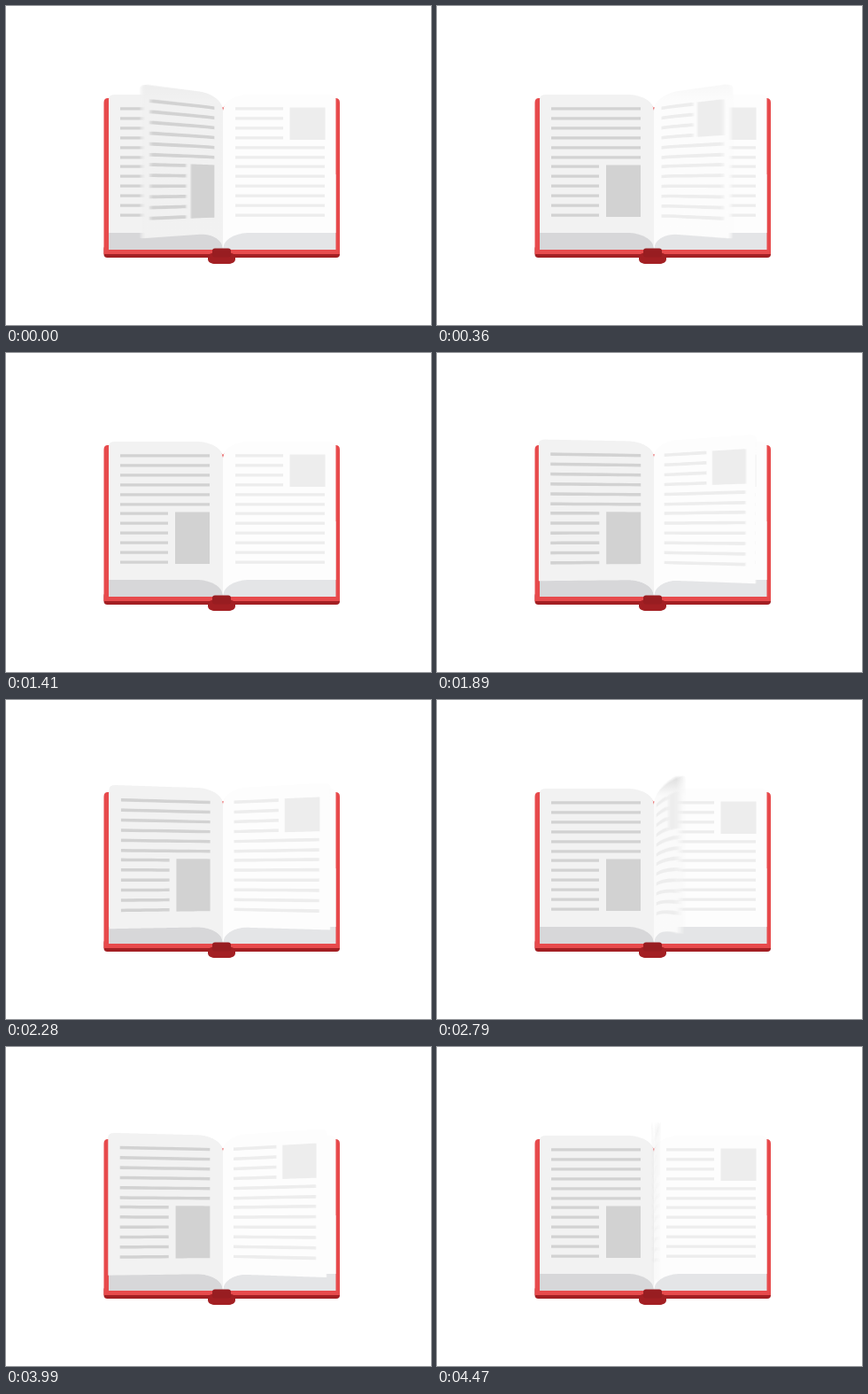
An HTML page with a canvas that plays this animation: 480x360 px, repeating every 4500 ms.

```html
<!DOCTYPE html>
<html lang="en">
<head>
<meta charset="utf-8">
<title>Flipping book</title>
<style>
  html, body { margin: 0; width: 100%; height: 100%; overflow: hidden; background: #fff; }
  canvas { display: block; }
</style>
</head>
<body>
<canvas id="stage" width="480" height="360"></canvas>
<script>
const STEP = 30, STEPS = 150;
const SPINE = 245, EYE_Y = 201, DEPTH = 950;
const LEFT_WIDTH = 129, RIGHT_WIDTH = 127.5;
const TOP = 100, BOTTOM = 256;
const SAMPLES = 8, SHUTTER = 0.12;

const out = document.getElementById('stage').getContext('2d');
const buffer = document.createElement('canvas');
buffer.width = 480;
buffer.height = 360;
const g = buffer.getContext('2d');

// Runs of page turns: time of the first upright page, gap, number of turns.
const runs = [
  { first: -22, gap: 7, count: 10 },
  { first: 50.7, gap: 7.1, count: 9 },
  { first: 128, gap: 7, count: 10 }
];

// Page angle in degrees around the moment it stands upright.
const turn = [[-5, 0], [-4, 15], [-3, 28], [-2, 31], [-1, 52], [0, 89], [1, 130],
  [2, 150], [3, 159], [4, 163], [5, 167], [5.8, 180]];

function angleAt(t) {
  for (let i = 1; i < turn.length; i++) {
    const [t0, a0] = turn[i - 1], [t1, a1] = turn[i];
    if (t <= t1) return a0 + (a1 - a0) * (t - t0) / (t1 - t0);
  }
  return 180;
}

function flyingPages(time) {
  const pages = [];
  for (const { first, gap, count } of runs) {
    for (let i = 0; i < count; i++) {
      const t = time - first - i * gap;
      if (t <= -5 || t >= 5.8) continue;
      let angle = angleAt(t);
      if (i === 0) angle = Math.min(angle, (t + 2.7) * 45);
      if (angle > 0) pages.push(angle);
    }
  }
  return pages;
}

const upright = a => Math.sin(a) ** 8;

function project(u, y, a, dip = 0) {
  const s = DEPTH / (DEPTH - u * Math.sin(a));
  return [SPINE + u * Math.cos(a) * s, EYE_Y + (y - EYE_Y) * s + dip];
}

// Drop of the paper towards the spine; an upright sheet bends over its whole width.
function sag(u, a) {
  const k = Math.max(0, 1 - u / (30 + 90 * upright(a)));
  return 18 * (1 - Math.sqrt(1 - k * k));
}

function block(a, u0, y0, u1, y1) {
  const n = 8;
  const point = (i, y) => {
    const u = u0 + (u1 - u0) * i / n;
    g.lineTo(...project(u, y, a, 0.6 * sag(u, a) * upright(a)));
  };
  g.beginPath();
  for (let i = 0; i <= n; i++) point(i, y0);
  for (let i = n; i >= 0; i--) point(i, y1);
  g.fill();
}

function leafPath(a, width) {
  const inner = width - 6;
  const edge = (u, y) => g.lineTo(...project(u, y, a, sag(u, a)));
  g.beginPath();
  for (let u = 0; u < inner; u += 1.5) edge(u, TOP);
  g.quadraticCurveTo(...project(width, TOP, a), ...project(width, TOP + 5, a));
  g.lineTo(...project(width, BOTTOM, a));
  for (let u = inner; u > 0; u -= 1.5) edge(u, BOTTOM);
  edge(0, BOTTOM);
  g.closePath();
}

function leaf(degrees) {
  const a = degrees * Math.PI / 180;
  const left = degrees > 90;
  leafPath(a, left ? LEFT_WIDTH : RIGHT_WIDTH);
  g.fillStyle = left ? '#f2f2f2' : '#fdfdfd';
  g.fill();

  // The tip above the book is darker while the sheet stands up.
  const tone = upright(a);
  if (tone > 0.01) {
    const shade = g.createLinearGradient(0, 84, 0, 108);
    shade.addColorStop(0, `rgba(0,0,0,${0.16 * tone})`);
    shade.addColorStop(1, `rgba(0,0,0,${0.015 * tone})`);
    g.fillStyle = shade;
    g.fill();
  }

  g.fillStyle = left ? '#d2d2d2' : '#ededed';
  for (let i = 0; i < 12; i++) {
    const y = 114.2 + i * 11 - (i > 5 ? 0.8 : 0);
    if (left) block(a, i > 5 ? 62 : 15, y, 116, y + 3.4);
    else block(a, 14, y, i < 4 ? 68 : 115, y + 3.4);
  }
  if (left) block(a, 15, 179.5, 54, 238);
  else block(a, 75.5, 114.5, 115.5, 151);
}

function box(color, x, y, w, h, r = 0) {
  g.fillStyle = color;
  g.beginPath();
  g.roundRect(x, y, w, h, r);
  g.fill();
}

function cover() {
  box('#a31f23', 110.5, 270, 266.5, 14, 4);
  g.fillStyle = '#e74a4c';
  g.beginPath();
  g.moveTo(110.5, 109);
  g.quadraticCurveTo(110.5, 104, 115, 104);
  g.lineTo(225, 104);
  g.quadraticCurveTo(239, 106, 245, 115);
  g.quadraticCurveTo(251, 106, 265, 104);
  g.lineTo(372, 104);
  g.quadraticCurveTo(377, 104, 377, 109);
  g.lineTo(377, 280);
  g.lineTo(110.5, 280);
  g.fill();
  box('#d7d7d9', 116, 190, 129, 85);
  box('#e4e5e7', 245, 190, 127.5, 85);
}

function spine() {
  box('#a31f23', 228, 279, 31, 11.5, 5);
  box('#a31f23', 232, 278, 23, 13, 3);
  box('#981d21', 233, 273.5, 21, 10, 3);
}

function scene(time) {
  g.fillStyle = '#fff';
  g.fillRect(0, 0, 480, 360);
  cover();
  leaf(0);
  leaf(180);
  const pages = flyingPages(time);
  pages.filter(a => a > 90).sort((a, b) => b - a).forEach(leaf);
  pages.filter(a => a <= 90).sort((a, b) => a - b).forEach(leaf);
  spine();
}

// Averages several moments to give the turning pages motion blur.
function draw(time) {
  for (let i = 0; i < SAMPLES; i++) {
    scene(time + SHUTTER * ((i + 0.5) / SAMPLES - 0.5));
    out.globalAlpha = 1 / (i + 1);
    out.drawImage(buffer, 0, 0);
  }
}

let shown = -1;
function tick() {
  const step = Math.floor(performance.now() / STEP) % STEPS;
  if (step !== shown) {
    shown = step;
    draw(step);
  }
  requestAnimationFrame(tick);
}
tick();
</script>
</body>
</html>
```
